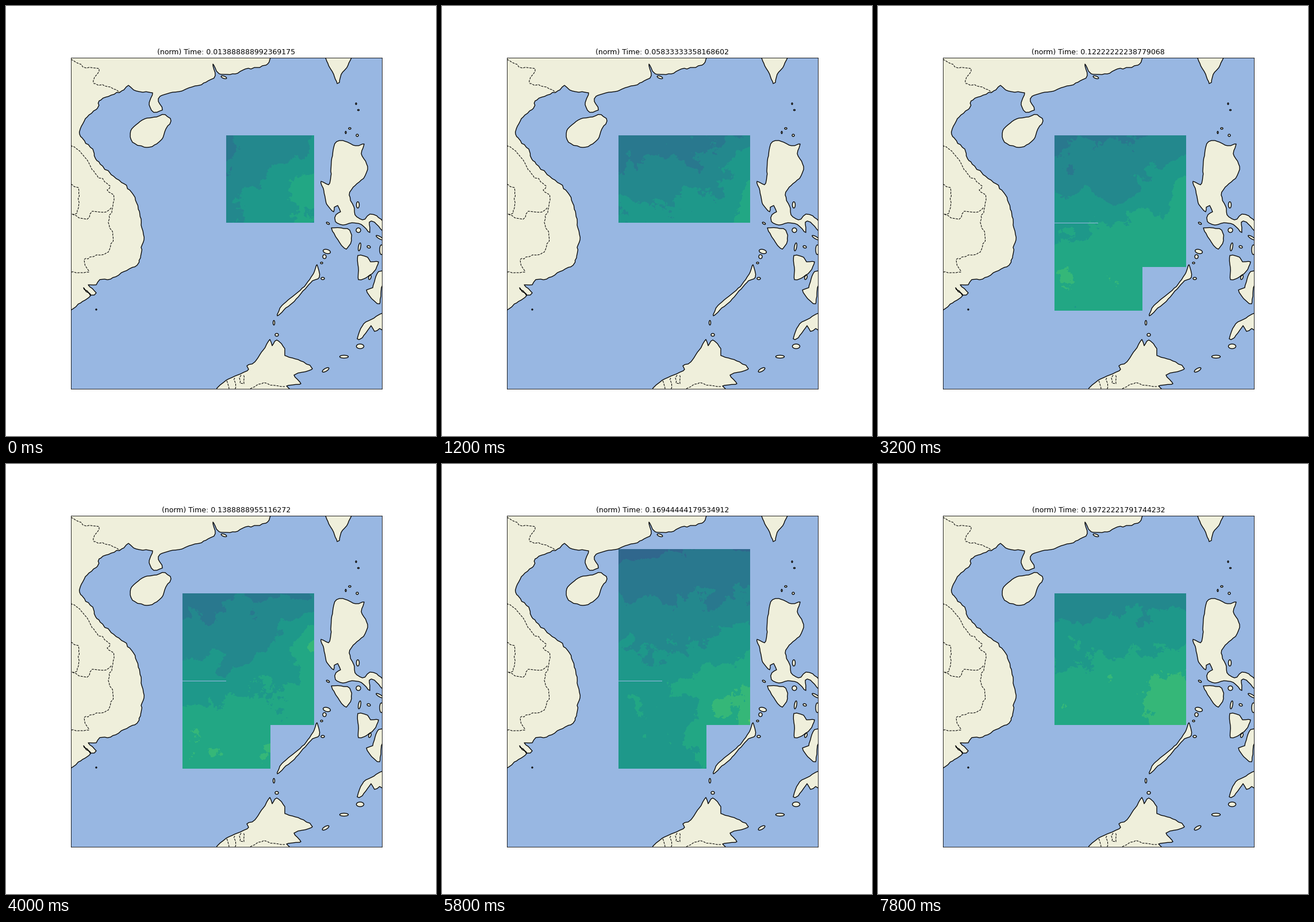
Recreate the animation shown at these times as a matplotlib script. Size 748x748 px, loop 8 s.

```python
import numpy as np
import matplotlib.pyplot as plt
from matplotlib.animation import FuncAnimation
from matplotlib.patches import Ellipse, Polygon

SIZE = 748
FRAMES, STEP = 40, 200
LAND, WATER = "#efefdb", "#98b7e2"
LEFT, RIGHT, TOP, BOTTOM = 112.85, 653.85, 89.76, 665.72
X0, Y0, CW, CH = 231.2, 148.0, 76.12, 76.5   # data cell grid
NX, NY = 304, 459

fig = plt.figure(figsize=(10, 10), dpi=74.8, facecolor="white")
ax = fig.add_axes([LEFT / SIZE, 1 - BOTTOM / SIZE,
                   (RIGHT - LEFT) / SIZE, (BOTTOM - TOP) / SIZE],
                  facecolor=WATER)
rng = np.random.default_rng(5)


# ---------- map ----------
def curve(xy, closed, amp):
    """Spline through a few points, with natural looking wiggles."""
    p = np.array(xy, float).reshape(-1, 2)
    if closed:
        p = np.vstack([p[-1], p, p[:2]])
    else:
        p = np.vstack([p[0], p, p[-1]])
    out = []
    for a, b, c, d in zip(p, p[1:], p[2:], p[3:]):
        n = max(1, round(np.hypot(*(c - b)) / 5))
        for k in range(n):
            t = k / n
            q = b + 0.4 * t * (c - a) \
                + t * t * (3 * (c - b) - 0.8 * (c - a) - 0.4 * (d - b)) \
                + t ** 3 * (2 * (b - c) + 0.4 * (c - a) + 0.4 * (d - b))
            out.append(q + (rng.normal(0, amp, 2) if k else 0))
    return np.array(out + [p[-2]])


def land(*xy, amp=0.4):
    ax.add_patch(Polygon(curve(xy, True, amp), fc=LAND, ec="black", lw=1.25,
                         joinstyle="round"))


def border(*xy):
    ax.plot(*curve(xy, False, 0.9).T, "--", color="black", lw=1)


# mainland
land(461, 88, 455, 101, 436, 107, 413, 111, 403, 117, 385, 119, 371, 118,
     364, 108, 360, 101, 364, 121, 356, 128, 340, 137, 323, 141, 308, 147,
     290, 150, 268, 157, 265, 166, 272, 181, 257, 185, 249, 172, 255, 151,
     238, 150, 222, 146, 213, 138, 205, 146, 183, 155, 162, 165, 159, 178,
     138, 196, 128, 223, 152, 252, 156, 266, 187, 296, 205, 309, 222, 329,
     232, 357, 236, 385, 240, 407, 235, 420, 234, 438, 228, 451, 205, 462,
     182, 475, 163, 476, 157, 485, 143, 485, 157, 499, 148, 503, 135, 490,
     147, 504, 133, 514, 113, 529, 90, 536, 90, 70, 461, 70, amp=0.65)
# northern islands
land(277, 189, 287, 200, 278, 214, 271, 232, 262, 240, 245, 246, 220, 237,
     217, 217, 233, 201, 242, 196, 262, 193)
land(557, 80, 558, 96, 571, 122, 576, 135, 580, 133, 583, 119, 595, 103, 600, 80)
# the large eastern island
land(575, 236, 586, 234, 608, 243, 623, 240, 618, 257, 629, 279, 622, 300,
     604, 315, 597, 329, 606, 352, 607, 363, 620, 372, 633, 362, 645, 365,
     662, 382, 662, 398, 641, 376, 632, 376, 633, 394, 618, 380, 602, 377,
     586, 381, 573, 375, 574, 363, 582, 358, 577, 347, 571, 350, 570, 358,
     558, 345, 553, 322, 548, 305, 561, 311, 565, 297, 566, 270, 570, 246)
# its southern neighbours
land(566, 386, 583, 386, 598, 390, 601, 408, 592, 423, 580, 411, 568, 392)
land(612, 434, 629, 437, 634, 445, 648, 445, 640, 462, 624, 474, 613, 476,
     613, 455)
land(660, 461, 648, 462, 642, 475, 638, 490, 627, 494, 636, 509, 650, 518,
     653, 490, 660, 478)
land(541, 450, 545, 472, 533, 478, 514, 499, 499, 516, 484, 528, 472, 539,
     480, 521, 499, 505, 522, 484, 536, 463)
land(660, 533, 640, 543, 622, 553, 611, 579, 620, 577, 635, 556, 641, 566,
     650, 561, 660, 565)
# southern coast
land(370, 672, 383, 651, 408, 640, 422, 632, 419, 626, 433, 619, 447, 599,
     459, 580, 463, 591, 471, 581, 485, 596, 485, 608, 508, 615, 533, 631,
     501, 642, 513, 657, 488, 661, 490, 672)

for islet in ((609, 170, 2, 3), (613, 181, 3, 2), (598, 213, 4, 3),
              (591, 220, 2, 4), (611, 225, 4, 4), (560, 378, 6, 3, 30),
              (613, 390, 8, 8), (612, 346, 5, 11), (558, 427, 13, 7, 15),
              (554, 436, 6, 7), (549, 447, 4, 3), (551, 474, 6, 4),
              (615, 419, 4, 14, 10), (631, 419, 6, 4, 20), (650, 403, 14, 4, 30),
              (653, 424, 6, 17), (633, 472, 4, 8, 20), (466, 551, 3, 8),
              (471, 572, 6, 5), (616, 592, 13, 8), (588, 610, 15, 5),
              (556, 633, 13, 5, -30), (157, 528, 2, 2), (379, 124, 10, 4, 20)):
    x, y, w, h, *turn = islet
    ax.add_patch(Ellipse((x, y), w, h, angle=sum(turn), fc=LAND, ec="black",
                         lw=1.25))

border(113, 93, 126, 100, 140, 108, 162, 109, 154, 124, 153, 135, 182, 141, 198, 149)
border(113, 242, 131, 256, 155, 291, 181, 313, 176, 320, 188, 335, 178, 377,
       186, 395, 178, 428, 136, 441, 144, 463, 113, 463)
border(183, 351, 175, 358, 150, 357, 141, 371, 113, 361)
border(113, 310, 127, 322, 124, 360, 113, 362)
border(384, 652, 388, 668)
border(398, 647, 398, 668)
border(409, 642, 407, 656, 414, 657, 413, 641)
border(425, 666, 445, 657, 485, 662)

# ---------- data fields ----------
u, v = np.meshgrid((np.arange(NX) + 0.5) * 4 / NX, (np.arange(NY) + 0.5) * 6 / NY)


def slope(start, east, south, cap=9):
    """Even gradient from the cell corner (1, 1), limited to cap."""
    return np.minimum(start + east * (u - 1) + south * (v - 1), cap)


def bump(height, cu, cv, su, sv):
    return height * np.exp(-((u - cu) / su) ** 2 - ((v - cv) / sv) ** 2)


FIELDS = [
    slope(-0.3, 0.6, 0.6) + bump(0.9, 3.9, 2.2, 0.8, 0.4),
    slope(0, 0.1, 0.9) + bump(1.5, 4.2, 2.2, 0.6, 2),
    slope(3.1, 0, 0) + bump(-1.1, 0, 4, 0.6, 0.5) + bump(0.8, 2.5, 4.6, 0.7, 0.5)
    + bump(0.8, 1.1, 5.5, 0.4, 0.5) + bump(0.8, 1.9, 5.3, 0.3, 0.5),
    slope(0, 0.25, 1.1, 3.1) + bump(1, 4, 2.2, 0.4, 0.6) - bump(0.8, 2.5, 2.3, 0.6, 0.3),
    slope(0, 0, 0.8, 3.1) + bump(2.7, 4.1, 2.2, 0.9, 0.9) + bump(0.6, 1.5, 4.4, 3, 0.8),
    slope(0.4, 0, 0.8, 2.1) + bump(-0.9, 1.2, 0, 0.8, 0.3)
    + bump(1.6, 4, 3.5, 1.3, 1.4) + bump(0.9, 4, 3.95, 0.25, 0.2),
    slope(0.75, 0.1, 1.15, 3.1) + bump(1.1, 4, 3.6, 1, 0.8),
]
KEYS = [0, 6, 11, 16, 24, 29, 39]
DAYS = [5, 21, 27, 44, 56, 61, 71]

# each swath tile is two cells wide and high, named by its top left cell
MAIN = {(1, 1), (2, 1), (2, 2), (1, 3)}
TILES = [{(2, 1)}, {(1, 1), (2, 1)}, {(1, 3), (0, 4)}, MAIN, MAIN,
         MAIN | {(1, 0), (2, 0)}, {(1, 1), (2, 1), (1, 2), (2, 2)}]

freq = np.hypot(np.fft.fftfreq(NY)[:, None], np.fft.rfftfreq(NX)[None, :])
SPECTRUM = np.where(freq > 0.008, np.maximum(freq, 0.008) ** -1.7, 0)


def noise(gen):
    n = np.fft.irfft2(np.fft.rfft2(gen.normal(size=(NY, NX))) * SPECTRUM, (NY, NX))
    return n / n.std()


def tiles(k, w, gen):
    if w in (0, 1):
        return TILES[k + int(w)]
    pool = sorted(TILES[k] | TILES[k + 1] | {(2, 2)})
    count = gen.integers(2, min(4, len(pool)) + 1)
    return [pool[j] for j in gen.permutation(len(pool))[:count]]


def swath(i):
    gen = np.random.default_rng(100 + i)
    k = min(int(np.searchsorted(KEYS, i, side="right")) - 1, len(KEYS) - 2)
    w = (i - KEYS[k]) / (KEYS[k + 1] - KEYS[k])
    z = (1 - w) * FIELDS[k] + w * FIELDS[k + 1] + 0.17 * noise(gen)
    shown = np.zeros((NY, NX), bool)
    for tx, ty in tiles(k, w, gen):
        shown |= (u > tx) & (u < tx + 2) & (v > ty) & (v < ty + 2)
    return np.ma.masked_where(~shown, 0.4 + np.rint(z) / 15)


image = ax.imshow(swath(0), cmap="viridis", vmin=0, vmax=1, aspect="auto",
                  interpolation="nearest", zorder=5,
                  extent=(X0, X0 + 4 * CW, Y0 + 6 * CH, Y0))
title = ax.set_title("", fontsize=12, fontfamily="DejaVu Sans")
ax.set(xlim=(LEFT, RIGHT), ylim=(BOTTOM, TOP), xticks=[], yticks=[])


def update(i):
    day = round(float(np.interp(i, KEYS, DAYS)))
    title.set_text(f"(norm) Time: {float(np.float32(day / 360))}")
    image.set_data(swath(i))
    return image, title


anim = FuncAnimation(fig, update, frames=FRAMES, interval=STEP,
                     init_func=lambda: update(0), repeat=True, repeat_delay=0)
plt.show()
```
